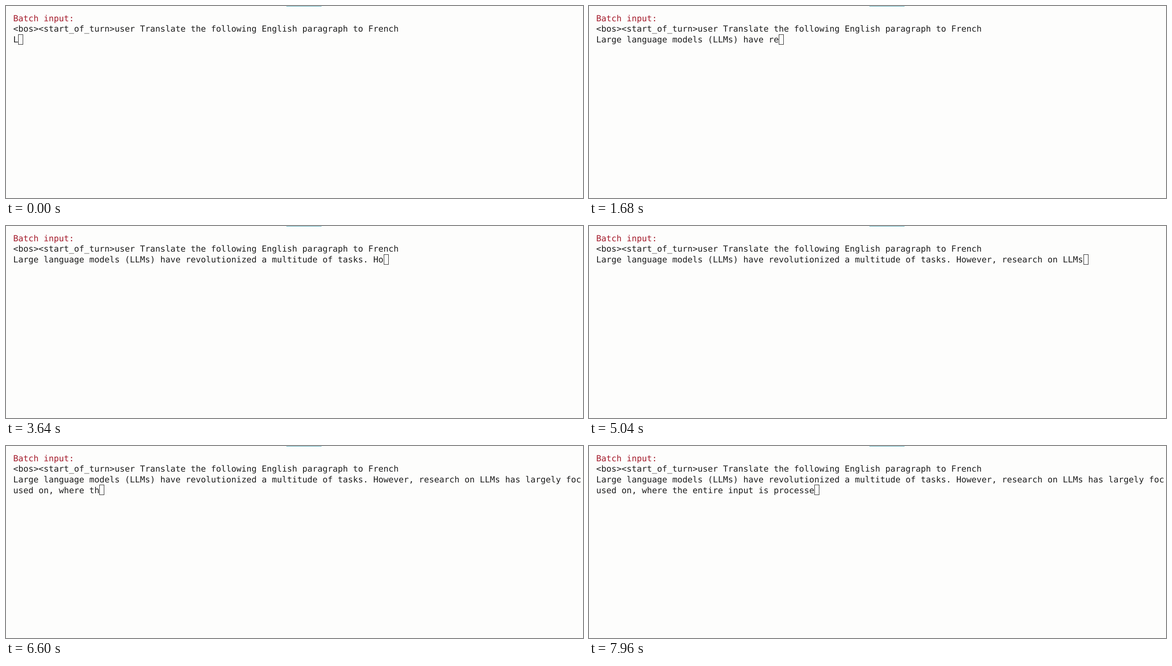
Write an HTML page that moves like this. It is 1280 by 427 pixels and loops after 8 s.

```html
<!DOCTYPE html>
<html lang="en">
<head>
<meta charset="utf-8">
<title>Terminal typing</title>
<style>
  html, body { margin: 0; width: 100%; height: 100%; overflow: hidden; background: #fdfdfc; }
  svg { display: block; width: 100vw; height: 100vh; }
  text {
    font: 18.706px "DejaVu Sans Mono", monospace;
    fill: #1e1e1e;
    white-space: pre;
    text-rendering: geometricPrecision;
  }
  .title { fill: #a51d2d; }
  #cursor { fill: none; stroke: #1e1e1e; }
</style>
</head>
<body>
<svg viewBox="0 0 1280 427">
  <rect x="622" width="78" height="1" fill="#48a5b4"/>
  <text class="title" x="15.9" y="33.7">Batch input:</text>
  <text x="15.9" y="57.4">&lt;bos&gt;&lt;start_of_turn&gt;user Translate the following English paragraph to French</text>
  <text id="row0" x="15.9" y="81"></text>
  <text id="row1" x="15.9" y="104.6"></text>
  <rect id="cursor" width="10" height="22"/>
</svg>
<script>
const LOOP = 8000, COLS = 112, CELL = 11.262, LEFT = 15.9, PITCH = 23.67;
const TEXT = "Large language models (LLMs) have revolutionized a multitude of tasks. " +
  "However, research on LLMs has largely focused on, where the entire input is processe";

// The screen refreshes in regular bursts with a pause after each.
const START = 140, PERIOD = 700, STEP = 70, LAST_STEP = 6;

// Typing speed varies a little: [time, characters typed]
const KEYS = [[0, 1], [560, 11], [1680, 36], [3640, 73], [5040, 96], [6580, 129], [7910, 155]];

const rows = [0, 1].map(i => document.getElementById("row" + i));
const cursor = document.getElementById("cursor");

function lastRefresh(t) {
  if (t < START) return 0;
  const phase = (t - START) % PERIOD;
  return t - phase + STEP * Math.min(Math.floor(phase / STEP), LAST_STEP);
}

function typedAt(t) {
  const i = Math.max(1, KEYS.findIndex(key => key[0] >= t));
  const [t0, n0] = KEYS[i - 1], [t1, n1] = KEYS[i];
  return Math.floor(n0 + (n1 - n0) * (t - t0) / (t1 - t0) + 1e-6);
}

function draw(t) {
  const n = typedAt(Math.round(lastRefresh(t + 0.01)));
  const line = Math.floor(n / COLS);
  rows.forEach((row, i) => {
    row.textContent = TEXT.slice(i * COLS, Math.min(n, (i + 1) * COLS));
  });
  cursor.setAttribute("x", Math.round(LEFT + (n % COLS) * CELL) + 0.5);
  cursor.setAttribute("y", Math.round(62.6 + line * PITCH) + 0.5);
}

function tick() {
  draw(performance.now() % LOOP);
  requestAnimationFrame(tick);
}
tick();
</script>
</body>
</html>
```
